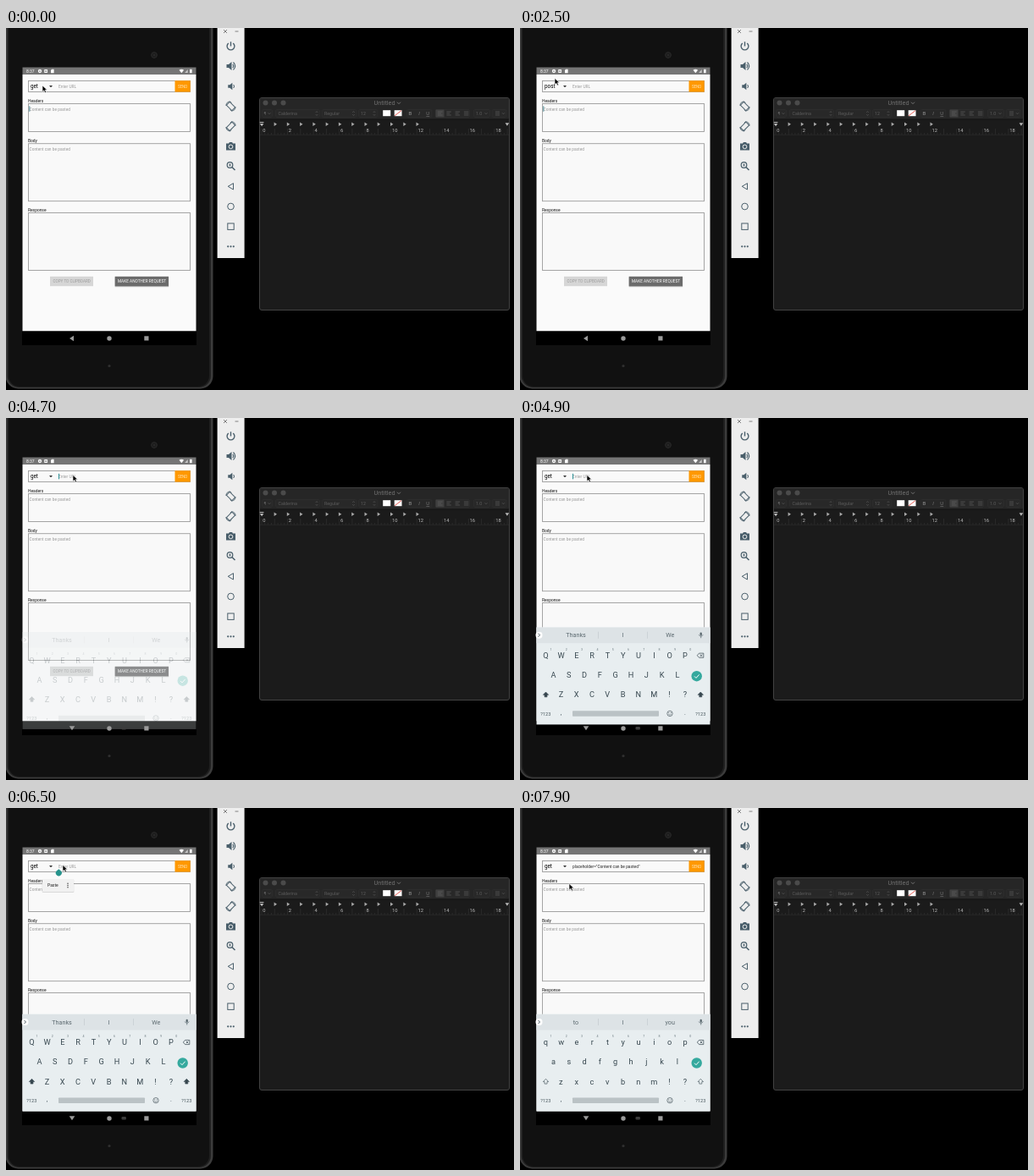
These frames come from a looping animation (600x428 px, 8 s). An HTML page:

```html
<!DOCTYPE html>
<html lang="en">
<head>
<meta charset="utf-8">
<title>Request form demo</title>
<style>
html, body { margin: 0; width: 100%; height: 100%; overflow: hidden; background: #000; }
svg { display: block; width: 100vw; height: 100vh; font-family: Roboto, sans-serif; }
</style>
</head>
<body>
<svg id="stage" viewBox="0 0 600 428"></svg>
<script>
const LOOP = 8000;
const stage = document.getElementById('stage');

// Markup helpers
const rect = (x, y, w, h, fill, extra = '') =>
  `<rect x="${x}" y="${y}" width="${w}" height="${h}" fill="${fill}" ${extra}/>`;
const circle = (x, y, r, fill, extra = '') =>
  `<circle cx="${x}" cy="${y}" r="${r}" fill="${fill}" ${extra}/>`;
const path = (d, fill, extra = '') => `<path d="${d}" fill="${fill}" ${extra}/>`;
const line = (d, color, width = 1, extra = '') =>
  `<path d="${d}" fill="none" stroke="${color}" stroke-width="${width}" ${extra}/>`;
const text = (x, y, size, fill, str, extra = '') =>
  `<text x="${x}" y="${y}" font-size="${size}" fill="${fill}" ${extra}>${str}</text>`;
const mid = (x, y, size, fill, str, extra = '') =>
  text(x, y, size, fill, str, `text-anchor="middle" ${extra}`);
const group = (id, body, extra = '') => `<g id="${id}" ${extra}>${body}</g>`;
const at = (x, y, body) => `<g transform="translate(${x} ${y})">${body}</g>`;

function tablet() {
  return rect(-.5, -20, 245, 446.5, '#3b3b3b', 'rx="15"') +
    rect(1.5, -20, 240.5, 445, '#202020', 'rx="14"') +
    rect(3, -20, 237, 444, '#111', 'rx="13"') +
    circle(175, 32, 3.4, '#1d1d1d', 'stroke="#292929"') + circle(175, 32, 1.2, '#282828') +
    circle(122, 399.5, 1.6, '#303030');
}

function statusBar() {
  return rect(19.5, 46.5, 205, 8.5, '#757575') +
    text(24, 53, 5, '#fff', '8:37') +
    circle(40, 51, 1.5, 'none', 'stroke="#fff" stroke-width="1.3"') +
    rect(45.3, 49, 3.6, 4, '#fff') + rect(46.4, 50.2, 1.4, 1.7, '#757575') +
    path('M53 50l1-1.2h2.6v4.4H53z', '#fff') +
    path('M204.5 49.8q2.8-2 5.6 0L207.3 53.2z', '#fff') +
    path('M211.2 53l3.5-4v4z', '#c8c8c8') +
    rect(217, 48.8, 2.6, 4.4, '#fff');
}

const box = (y, h) => rect(26.5, y, 191, h, '#f9f9f9', 'stroke="#9c9c9c" stroke-width=".9"');
const hint = (x, y, str, extra = '') => text(x, y, 4.85, '#9a9a9a', str, extra);
const label = (y, str) => text(26, y, 4.9, '#111', str);

function form() {
  return rect(19.5, 55, 205, 303.5, '#fafafa') +
    box(62.5, 13) +
    circle(53, 69, 6.3, '#d3d3d3', 'id="ripple"') +
    text(29, 71.2, 6.3, '#000', 'get', 'id="method"') +
    path('M51 68h4l-2 2.2z', '#333') +
    hint(62, 70.8, 'Enter URL', 'id="urlHint"') +
    text(62, 70.8, 4.85, '#222', 'placeholder="Content can be pasted"', 'id="urlText"') +
    rect(199.5, 62.2, 18.2, 13.4, '#ff9800') +
    mid(208.6, 70.6, 4.5, '#ffe3b5', 'SEND') +
    label(87.8, 'Headers') + box(89.5, 33) + hint(27.5, 97.8, 'Content can be pasted') +
    label(135.2, 'Body') + box(136.7, 68) + hint(27.5, 145.2, 'Content can be pasted') +
    label(217, 'Response') + box(218.5, 68) +
    rect(52, 293.8, 51, 11.4, '#d6d6d6') +
    mid(77.7, 301.2, 4.6, '#9c9c9c', 'COPY TO CLIPBOARD') +
    rect(128.7, 294.5, 63.5, 11.7, '#bbb') +
    rect(128.7, 293.8, 63.3, 11.4, '#6b6b6b') +
    mid(160.5, 301.3, 4.75, '#fff', 'MAKE ANOTHER REQUEST') +
    rect(27.3, 92.3, 1, 6.5, '#4f8f9a', 'id="headerCaret"') +
    rect(62, 65.8, 1, 6.5, '#2b8f94', 'id="urlCaret"');
}

const navBar = () => rect(19, 358.5, 206, 16.5, '#000');

function navIcons() {
  return path('M80 363.7v6.6l-5-3.3z', '#9a9a9a', 'id="navBack"') +
    path('M74.7 364.3h6.6l-3.3 5z', '#9a9a9a', 'id="navDown"') +
    circle(122, 367, 2.7, '#9a9a9a') + rect(163.3, 364.3, 5.2, 5.2, '#9a9a9a') +
    rect(136.5, 365, 5.4, 3.6, '#3c3c3c', 'id="navKeys" rx="1"');
}

function keyRow(keys, x0, y) {
  return [...keys].map((key, i) => mid((x0 + i * 18.3).toFixed(1), y, 9.2, '#37474f', key)).join('');
}

function keySet(id, change, words, shiftFill) {
  const shift = x => path(`M${x} 320.3l3.2 3.3h-1.7v2.5h-3v-2.5h-1.7z`, shiftFill,
    'stroke="#37474f" stroke-width=".6"');
  return group(id,
    keyRow(change('QWERTYUIOP'), 30.3, 280.3) +
    keyRow(change('ASDFGHJKL'), 39.5, 303.3) +
    keyRow(change('ZXCVBNM!?'), 48.4, 326.5) +
    shift(30.5) + shift(213.3) +
    words.map((word, i) => mid(66 + i * 55.6, 255.6, 7.2, '#5b696f', word)).join(''));
}

function keyboard() {
  const digits = [...'1234567890'].map((d, i) =>
    mid((36.5 + i * 18.3).toFixed(1), 271, 3.6, '#68777d', d)).join('');
  return rect(19.5, 243.8, 205, 114.9, '#e8eef0') +
    rect(19.5, 243.8, 205, 18.7, '#dde3e6') +
    circle(22.5, 253, 4, '#fff') + line('M21.5 251l2 2-2 2', '#37474f', .9) +
    line('M92.5 249v8M150.5 249v8', '#c3cbce', .7) +
    rect(212.6, 249.7, 2.2, 4, '#55646a', 'rx="1.1"') +
    line('M211.2 252.5q2.5 4 5 0M213.7 254.5v2', '#55646a', .7) +
    digits +
    path('M209.3 277l2.2-2.6h5.3v5.2h-5.3z', 'none', 'stroke="#37474f" stroke-width=".7"') +
    line('M212.7 275.7l2.6 2.6m0-2.6l-2.6 2.6', '#37474f', .7) +
    keySet('upper', s => s, ['Thanks', 'I', 'We'], '#37474f') +
    keySet('lower', s => s.toLowerCase(), ['to', 'I', 'you'], 'none') +
    circle(208.7, 301.5, 6.2, '#35a99e') + line('M206 301.7l2 2 3.6-4', '#fff', 1) +
    mid(30.3, 348, 5.6, '#48575d', '?123') + mid(213.3, 348, 5.6, '#48575d', '?123') +
    mid(48.5, 347, 7, '#37474f', ',') + mid(195, 347, 7, '#37474f', '.') +
    rect(62, 342.5, 102, 6.5, '#bac2c5', 'rx=".8"') +
    circle(177, 345.7, 3.2, 'none', 'stroke="#48575d" stroke-width=".7"') +
    circle(175.8, 344.8, .5, '#48575d') + circle(178.2, 344.8, .5, '#48575d') +
    line('M175.3 346.5q1.7 1.9 3.4 0', '#48575d', .6);
}

function spinnerMenu() {
  return rect(-.5, .7, 19, 29.5, '#000', 'opacity=".1"') +
    rect(0, 0, 18, 29, '#fafafa') +
    rect(0, 0, 18, 15, '#d2d2d2', 'id="pressed"') +
    text(2.5, 8, 6.2, '#111', 'get') + text(2.5, 24.7, 6.2, '#111', 'post');
}

function pasteMenu() {
  return rect(42.7, 84.6, 37.6, 15.5, '#000', 'opacity=".13" rx="1"') +
    rect(43, 84, 37, 15, '#f1f1f1', 'rx="1"') +
    text(49, 93.3, 5, '#222', 'Paste') +
    [89.3, 91.5, 93.7].map(y => circle(73, y, .7, '#333')).join('');
}

function emulatorPanel() {
  const ink = '#4a5f6b';
  const stroke = (d, w = 1.2) => line(d, ink, w);
  const speaker = path('M-5-2h2.5l3.5-3v10l-3.5-3H-5z', ink);
  const turn = flip => `<g transform="scale(${flip} 1)">` +
    rect(-2.7, -4.6, 5.4, 9.2, 'none', `transform="rotate(-45)" stroke="${ink}" stroke-width="1"`) +
    stroke('M-5.6-.8Q-5.4-5.2-.8-5.6l1.6 1.6M5.6.8Q5.4 5.2.8 5.6l-1.6-1.6', .9) + '</g>';
  const icons = [
    [21.5, stroke('M-2.7-3.5a4.4 4.4 0 1 0 5.4 0M0-5.3v5.3', 1.4)],
    [45, speaker + stroke('M2.3-2.2q2 2.2 0 4.4M3-4.5q4.5 4.5 0 9', 1.1)],
    [69, at(1, 0, `<g transform="scale(.85)">${speaker}</g>`) + stroke('M3.2-2q1.8 2 0 4', 1)],
    [92.5, turn(1)],
    [116.3, turn(-1)],
    [140, path('M-5.5-3.5h3l1-1.5h3l1 1.5h3v8h-11z', ink) + circle(0, .4, 2.3, ink, 'stroke="#eee"')],
    [163, circle(-1, -1, 3.3, 'none', `stroke="${ink}" stroke-width="1.2"`) +
      stroke('M1.5 1.5l3.5 3.5', 1.5) + stroke('M-2.6-1h3.2M-1-2.6v3.2', .8)],
    [187.3, stroke('M3-3.7v7.4l-6.3-3.7z', 1)],
    [211, circle(0, 0, 3.8, 'none', `stroke="${ink}" stroke-width="1"`)],
    [234.7, rect(-3.7, -3.7, 7.4, 7.4, 'none', `stroke="${ink}" stroke-width="1"`)],
    [258.3, [-3.3, 0, 3.3].map(x => circle(x, 0, 1.1, ink)).join('')]
  ];
  return rect(249.6, 0, 32, 272, '#eee') +
    line('M257 2l4 4m0-4l-4 4M270.5 4h4', '#666', .8) +
    icons.map(([y, icon]) => at(265.5, y, icon)).join('');
}

function editor() {
  const dim = '#5c5c5c';
  const field = (x, w) => rect(x, 96.5, w, 9, '#282828', 'rx="1.5" stroke="#323232" stroke-width=".6"');
  const stepper = x => line(`M${x - 1.3} 100l1.3-1.5 1.3 1.5m-2.6 2l1.3 1.5 1.3-1.5`, dim, .6);
  const drop = x => line(`M${x - 1.4} 100.3l1.4 1.5 1.4-1.5`, dim, .7);
  let out = rect(299.5, 82.5, 295, 251, '#1b1b1b', 'rx="2.5" stroke="#424242"') +
    rect(300, 83, 294, 25, '#262626', 'rx="2"') +
    line('M300 108h294', '#111', .8);
  for (const x of [306.5, 317, 327.5]) out += circle(x, 88.5, 3, '#4b4b4b');
  out += mid(447, 91, 7.3, '#707070', 'Untitled') + line('M462 87.7l2 2 2-2', '#777', 1);
  for (const [x, w] of [[302.5, 12], [318.5, 52], [373, 41], [416.5, 22.5],
    [473, 30], [507.5, 40], [552.5, 19], [574, 17]]) out += field(x, w);
  out += text(304.5, 103.2, 5.5, dim, '¶') + drop(311) +
    text(321.5, 103, 5.3, dim, 'Calderina') + stepper(367) +
    text(376, 103, 5.3, dim, 'Regular') + stepper(410.5) +
    text(419, 103, 5.3, dim, '12') + stepper(435) +
    rect(445.2, 97.2, 9, 7, '#fff') + rect(458.7, 97.2, 8.8, 7, '#fff') +
    line('M459 103.8l8-6.2', '#e0352b', .8) +
    mid(477.5, 103.2, 6, '#757575', 'B', 'font-weight="bold"') +
    mid(488, 103.2, 6, '#757575', 'I', 'font-style="italic"') +
    mid(498.3, 103.2, 6, '#757575', 'U', 'text-decoration="underline"') +
    rect(507.5, 96.5, 10, 9, '#404040');
  for (let i = 0; i < 4; i++) {
    const x = 510 + i * 10.3;
    out += line(`M${x} 99h5.5M${x} 101h${i == 3 ? 5.5 : 4}M${x} 103h5.5`, dim, .7);
  }
  out += text(555, 103, 5.3, dim, '1.0') + drop(567) +
    line('M578 99h5M578 101h5M578 103h5', dim, .7) + drop(587.5);

  // Ruler: a tick every quarter unit, a tab stop on each of the first twelve units
  const unit = 15.27, zero = 302;
  for (let i = 0; i < 77; i++) {
    const x = (zero + i * unit / 4).toFixed(1);
    out += line(`M${x} 126v${i % 4 ? -2 : -7}`, '#3a3a3a', .5);
  }
  out += line('M300 126.3h294', '#303030', .6);
  for (let i = 1; i <= 12; i++) {
    out += path(`M${(zero + i * unit - .7).toFixed(1)} 111.5v4.6l3.4-2.3z`, '#aaa');
  }
  out += path('M299.8 111h4.6v1h-4.6zM299.8 113h4.6l-2.3 3.2z', '#bbb') +
    path('M589.6 112.3h4.6l-2.3 3.4z', '#bbb');
  for (let n = 0; n < 20; n += 2) {
    out += text((zero + 1.3 + n * unit).toFixed(1), 123.3, 5.8, '#bdbdbd', n);
  }
  return out;
}

const pointerShape = path('M0 0v7.4l1.8-1.6 1.3 2.7 1.4-.7-1.3-2.6h2.4z', '#000',
  'stroke="#fff" stroke-width=".6"');

stage.innerHTML = tablet() + statusBar() + form() + navBar() +
  group('keyboard', keyboard()) + navIcons() +
  group('spinnerMenu', spinnerMenu()) +
  path('M62.3 72.2l2.6 2.2a3.5 3.5 0 1 1-5.2 0z', '#26938c', 'id="handle"') +
  group('pasteMenu', pasteMenu()) +
  emulatorPanel() + editor() + group('pointer', pointerShape);

const el = id => document.getElementById(id);
const show = (id, opacity) => el(id).setAttribute('opacity', +opacity);
const move = (id, x, y) => el(id).setAttribute('transform', `translate(${x.toFixed(2)} ${y.toFixed(2)})`);
const ramp = (t, a, b) => Math.min(1, Math.max(0, (t - a) / (b - a)));
const within = (t, a, b) => t >= a && t < b;
const fade = (t, a, b) => ramp(t, a, a + 150) * (1 - ramp(t, b, b + 150));
const blink = (t, start) => (t - start) % 1000 < 500;

// Pointer stops: time, x, y
const stops = [
  [950, 43, 68], [1400, 36, 82], [1950, 36, 82], [2350, 41, 59.5], [2800, 41, 59.5],
  [3200, 40, 67], [3450, 40, 67], [3800, 37, 72], [4250, 37, 72], [4650, 79, 67.5],
  [5150, 79, 67.5], [5500, 67, 67.5], [6700, 67, 67.5], [7150, 58, 89.5]
];

function pointerAt(t) {
  const next = stops.findIndex(stop => stop[0] > t);
  if (next < 0) return stops[stops.length - 1].slice(1);
  if (!next) return stops[0].slice(1);
  const [a, b] = [stops[next - 1], stops[next]];
  const k = ramp(t, a[0], b[0]);
  const eased = k * k * (3 - 2 * k);
  return [1, 2].map(i => a[i] + (b[i] - a[i]) * eased);
}

function render(t) {
  const keysUp = t >= 4650;
  const pasted = t >= 7350;
  const second = t > 3000;

  move('pointer', ...pointerAt(t));
  el('method').textContent = within(t, 1900, 4000) ? 'post' : 'get';

  show('spinnerMenu', second ? fade(t, 3300, 3980) : fade(t, 700, 1850));
  if (second) move('spinnerMenu', 26.2, 63.4);
  else move('spinnerMenu', 28.8, 60.2);
  show('pressed', within(t, 3900, 4300));
  show('ripple', fade(t, 600, 1900));

  const headerCaret = t < 700 ? blink(t, 0)
    : within(t, 2050, 3300) ? blink(t, 2050)
    : within(t, 4000, 4650) && blink(t, 4000);
  show('headerCaret', headerCaret);
  show('urlCaret', keysUp && blink(t, pasted ? 7350 : 4650));
  show('urlHint', !pasted);
  show('urlText', pasted);

  const drop = 1 - ramp(t, 4650, 5250);
  move('keyboard', 0, 11 * drop * drop);
  show('keyboard', ramp(t, 4650, 4850));
  show('upper', !pasted);
  show('lower', pasted);
  show('navBack', !keysUp);
  show('navDown', keysUp);
  show('navKeys', keysUp);

  show('handle', within(t, 6000, 7350));
  show('pasteMenu', fade(t, 6000, 7350));
}

const begin = performance.now();
function tick() {
  render((performance.now() - begin) % LOOP);
  requestAnimationFrame(tick);
}
tick();
</script>
</body>
</html>
```
